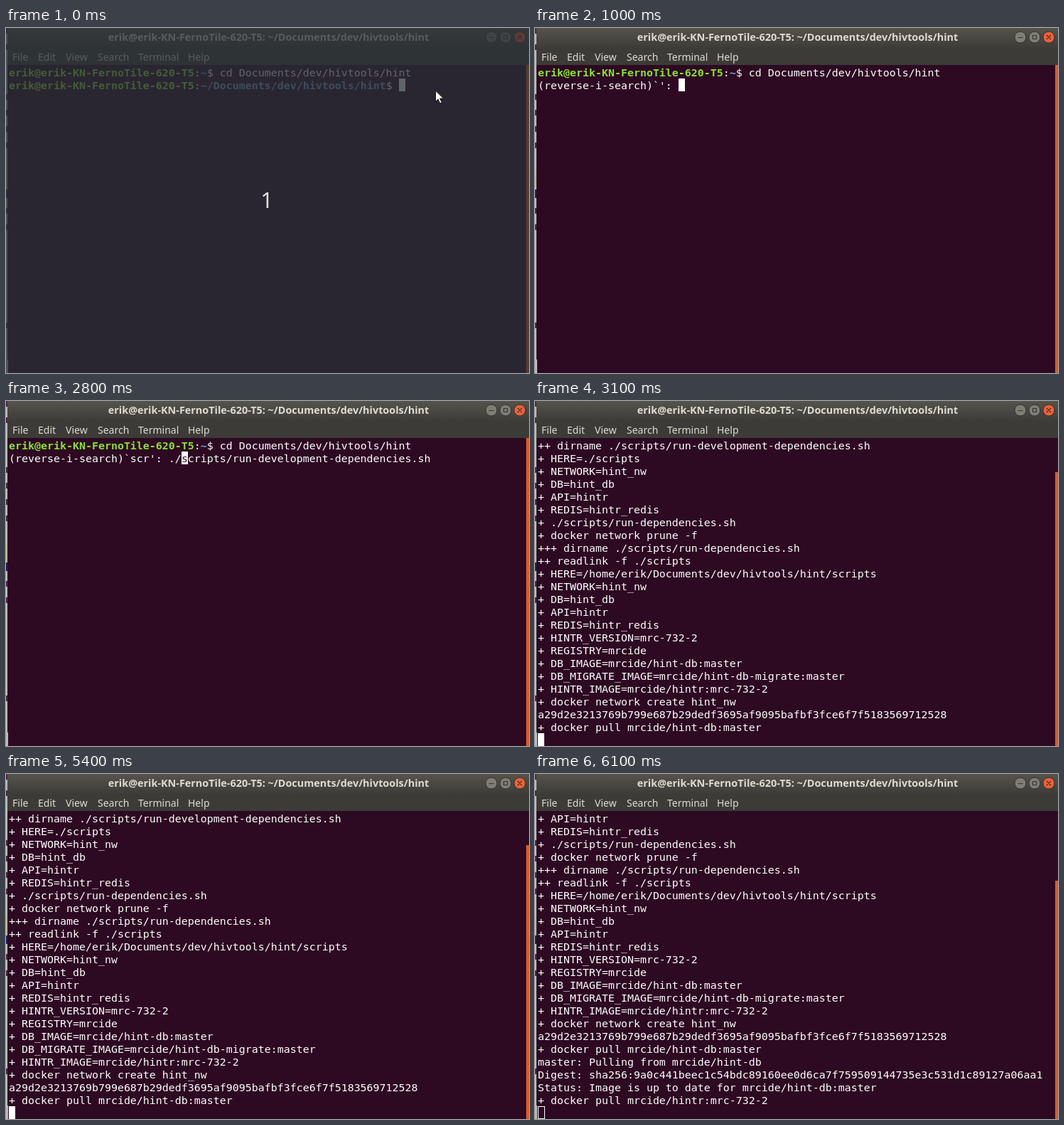
An HTML page that plays this animation: 736 px wide and 485 px high, repeating every 6200 ms.

```html
<!DOCTYPE html>
<html lang="en">
<head>
<meta charset="utf-8">
<title>Terminal</title>
<style>
html, body { margin: 0; width: 100%; height: 100%; overflow: hidden; background: #2d0922; }
svg { display: block; width: 736px; height: 485px; }
text { white-space: pre; }
.ui { font: 14px "Noto Sans", sans-serif; fill: #dfdbd2; }
.title { font-weight: 700; font-size: 14.4px; text-anchor: middle; }
.term { font: 14.95px "DejaVu Sans Mono", monospace; fill: #fff; }
.user { font-weight: 700; fill: #8ae234; }
.path { font-weight: 700; fill: #729fcf; }
.count { font: 31px "Noto Sans", sans-serif; fill: #e0e0e0; text-anchor: middle; }
</style>
</head>
<body>
<svg viewBox="0 0 736 485">
  <defs>
    <linearGradient id="bar" x1="0" y1="0" x2="0" y2="1">
      <stop offset="0" stop-color="#55534b"/>
      <stop offset="1" stop-color="#3d3c37"/>
    </linearGradient>
  </defs>
  <rect width="736" height="485" fill="#2d0922"/>
  <g id="edge"></g>
  <rect x="2" width="734" height="28" fill="url(#bar)"/>
  <rect x="2" y="28" width="734" height="24" fill="#3c3b37"/>
  <text id="title" class="ui title" x="369.5" y="18"></text>
  <g id="menu"></g>
  <g stroke="#33322d" fill="#807d75">
    <circle cx="683" cy="13" r="8"/>
    <circle cx="703" cy="13" r="8"/>
    <circle cx="723" cy="13" r="8" fill="#ee6039"/>
  </g>
  <path d="M679.5 13.5h7M700.5 10.5h5v5h-5zM720 10l6 6m0-6l-6 6" fill="none" stroke="#35342f" stroke-width="1.2"/>
  <rect id="thumb" x="732" width="4" fill="#dc5a28"/>
  <g id="screen"></g>
  <g id="beam" fill="none">
    <path d="M-3 -6.5h2.5l.5 .5l.5 -.5h2.5M0 -6v12M-3 6.5h2.5l.5 -.5l.5 .5h2.5" stroke="#e8e8e8" stroke-width="1.2"/>
  </g>
  <g id="intro">
    <rect width="736" height="485" fill="#2a3036" fill-opacity=".75"/>
    <text class="count" x="367" y="253">1</text>
    <path d="M604.5 88v15.500l3.600-3.400 2.600 6 2.600-1.100-2.600-5.900h4.900z" fill="#fff" stroke="#111"/>
  </g>
</svg>
<script>
const LOOP = 6200, ROWS = 24, COLS = 80, CELL = 9, LINE = 18, LEFT = 4, TOP = 53;
const $ = id => document.getElementById(id);
const USER = 'erik', HOST = USER + '@' + USER + '-KN-FernoTile-620-T5';
const DIR = '~/Documents/dev/hivtools/hint';
const CMD = './scripts/run-development-dependencies.sh';

const span = (cls, s) => `<tspan class="${cls}">${s}</tspan>`;
const prompt = (dir, rest) => span('user', HOST) + ':' + span('path', dir) + '$ ' + rest;

const cdLine = prompt('~', 'cd Documents/dev/hivtools/hint');
const promptLen = (HOST + ':' + DIR + '$ ').length;
const room = COLS - promptLen;

const script = `++ dirname ${CMD}
+ HERE=./scripts
+ NETWORK=hint_nw
+ DB=hint_db
+ API=hintr
+ REDIS=hintr_redis
+ ./scripts/run-dependencies.sh
+ docker network prune -f
+++ dirname ./scripts/run-dependencies.sh
++ readlink -f ./scripts
+ HERE=/home/${USER}/Documents/dev/hivtools/hint/scripts
+ NETWORK=hint_nw
+ DB=hint_db
+ API=hintr
+ REDIS=hintr_redis
+ HINTR_VERSION=mrc-732-2
+ REGISTRY=mrcide
+ DB_IMAGE=mrcide/hint-db:master
+ DB_MIGRATE_IMAGE=mrcide/hint-db-migrate:master
+ HINTR_IMAGE=mrcide/hintr:mrc-732-2
+ docker network create hint_nw
a29d2e3213769b799e687b29dedf3695af9095bafbf3fce6f7f5183569712528
+ docker pull mrcide/hint-db:master
master: Pulling from mrcide/hint-db
Digest: sha256:9a0c441beec1c54bdc89160ee0d6ca7f759509144735e3c531d1c89127a06aa1
Status: Image is up to date for mrcide/hint-db:master
+ docker pull mrcide/hintr:mrc-732-2`.split('\n');

const log = [cdLine, prompt(DIR, CMD.slice(0, room)), CMD.slice(room), ...script];

// Each state: lines, cursor column and the letter under the cursor
const search = (typed, found, at) => {
  const line = "(reverse-i-search)`" + typed + "': " + found;
  const col = line.length - found.length + at;
  return { lines: [cdLine, line], col, under: line[col] || '' };
};
const output = n => ({ lines: [...log.slice(0, 3 + n), ''], col: 0, under: '' });

const states = [
  [0, { lines: [cdLine, prompt(DIR, '')], col: promptLen, under: '' }],
  [1000, search('', '', 0)],
  [1800, search('s', 'cd Documents/dev/hivtools/hint', 24)],
  [1900, search('sc', CMD, 2)],
  [2000, search('scr', CMD, 2)],
  [3000, output(8)],
  [3100, output(23)],
  [5700, output(26)],
  [5800, output(27)]
];
const blinks = [[1500, 1600], [2400, 2800], [3400, 4100], [4600, 5000]];

// The pointer speeds up towards the upper right, then leaves
function beamAt(t) {
  if (t >= 400 && t < 600) return [606.5, 90];
  if (t < 5000 || t >= 5400) return null;
  const k = (Math.floor(t / 100) - 50) / 3;
  return [606.5 + 6 * k * k, 90 - 22 * k * k];
}

function cursor(state, row, mode) {
  const x = LEFT + state.col * CELL, y = TOP + row * LINE;
  if (mode === 'off') return '';
  if (mode === 'hollow')
    return `<rect x="${x + .5}" y="${y + .5}" width="${CELL}" height="${LINE - 1}" fill="none" stroke="#fff"/>`;
  return `<rect x="${x}" y="${y}" width="${CELL}" height="${LINE}" fill="#fff"/>` +
    `<text class="term" x="${x}" y="${y + 15}" style="fill:#2d0922">${state.under}</text>`;
}

let shown = '';
function draw(t) {
  const i = states.findLastIndex(s => t >= s[0]);
  const mode = t >= 6100 ? 'hollow' : blinks.some(([a, b]) => t >= a && t < b) ? 'off' : 'on';
  if (shown !== i + mode) {
    shown = i + mode;
    const state = states[i][1], total = state.lines.length;
    const skip = Math.max(0, total - ROWS), view = state.lines.slice(skip);
    $('screen').innerHTML = view.map((s, r) =>
      `<text class="term" x="${LEFT}" y="${TOP + 15 + r * LINE}">${s}</text>`).join('') +
      cursor(state, view.length - 1, mode);
    const y = 52 + Math.round(433 * skip / Math.max(total, ROWS));
    $('thumb').setAttribute('y', y);
    $('thumb').setAttribute('height', 485 - y);
  }
  const p = beamAt(t);
  $('beam').style.display = p ? '' : 'none';
  if (p) $('beam').setAttribute('transform', `translate(${p})`);
  $('intro').style.display = t < 400 ? '' : 'none';
}

$('title').textContent = HOST + ': ' + DIR;
$('menu').innerHTML = [['File', 9], ['Edit', 45], ['View', 84], ['Search', 129], ['Terminal', 186], ['Help', 256]]
  .map(([s, x]) => `<text class="ui" x="${x}" y="46">${s}</text>`).join('');

// Sliver of the window behind
const bit = (y, h, c, w = 2) => `<rect y="${y}" width="${w}" height="${h}" fill="${c}"/>`;
$('edge').innerHTML = bit(0, 485, '#bdbabd') + bit(466, 19, '#bdbabd', 3) + bit(200, 26, '#b9b99c') +
  [4, 27, 97, 119, 142, 165, 257, 280, 418].map(y => bit(y - 4, 8, '#4d2a4c')).join('') +
  bit(227, 12, '#22225c');

const start = performance.now();
function tick() {
  draw((performance.now() - start) % LOOP);
  requestAnimationFrame(tick);
}
draw(0);
requestAnimationFrame(tick);
</script>
</body>
</html>
```
